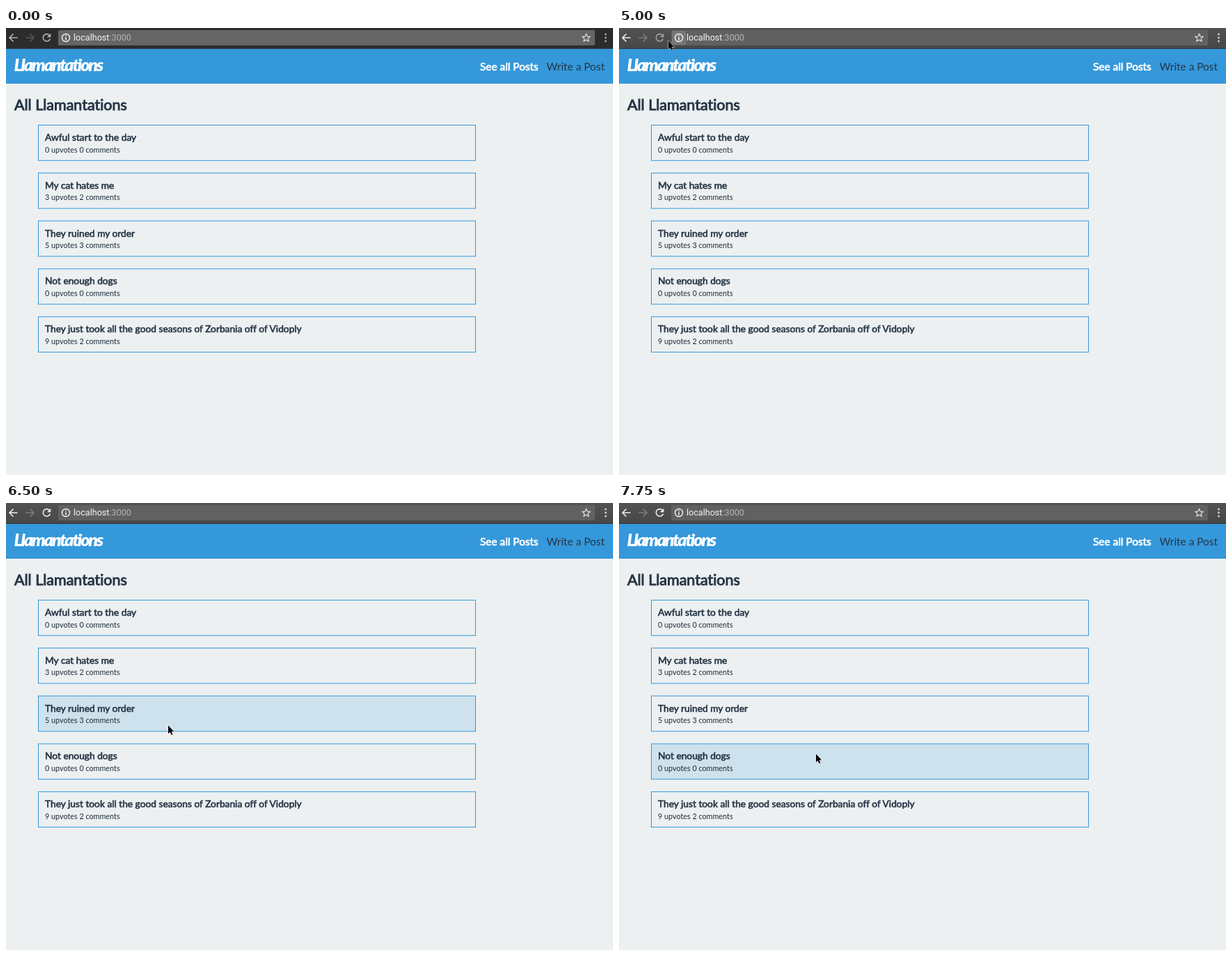
An HTML page that plays this animation: 872 by 642 pixels, repeating every 8 s.

```html
<!DOCTYPE html>
<html lang="en">
<head>
<meta charset="utf-8">
<title>All Llamantations</title>
<style>
  html, body { margin: 0; width: 100%; height: 100%; overflow: hidden; background: #ecf0f1; }
  svg { display: block; }
  text { font-family: Lato, sans-serif; fill: #263545; font-variant-ligatures: none; }
  /* Emboldened regular weight, keeping its narrower advances */
  .bold { stroke: #263545; stroke-width: .045em; }
  .heading { font-size: 21.5px; }
  .title { font-size: 13.76px; }
  .info { font-size: 10.8px; fill: #1f2c38; }
  .nav { font-size: 15.4px; }
  .current { fill: #fff; stroke: #fff; }
  .logo { font-size: 25px; font-weight: 900; font-style: italic; letter-spacing: -2.1px; fill: #fff; }
  .url { font: 12.6px Roboto, sans-serif; fill: #f4f4f4; }
  .row { stroke: #3498db; }
  .icon { fill: none; stroke-width: 1.6; }
</style>
</head>
<body>
<svg width="872" height="642" viewBox="0 0 872 642">
  <defs>
    <linearGradient id="active" x2="0" y2="1">
      <stop stop-color="#525252"/><stop offset="1" stop-color="#474747"/>
    </linearGradient>
  </defs>
  <rect width="872" height="642" fill="#ecf0f1"/>

  <rect id="bar" width="872" height="30"/>
  <rect y="29" width="872" height="1" fill="#333"/>
  <rect id="button" x="48" y="4" width="21" height="20" rx="2"/>
  <rect id="field" x="75" y="3" width="771" height="22" rx="2"/>
  <rect id="infoHover" x="76" y="4" width="20" height="20" rx="2" fill="#777"/>
  <path id="back" class="icon" d="M16.5 14H5.5M10.5 8.5L5 14L10.5 19.5"/>
  <path id="forward" class="icon" d="M28.5 14H39.5M34.5 8.5L40 14L34.5 19.5"/>
  <g id="reload">
    <path class="icon" d="M62.3 10.2A5.2 5.2 0 1 0 63.4 15.6"/>
    <path d="M64.3 7.8V13.2H58.9Z" stroke="none"/>
  </g>
  <circle cx="86" cy="14" r="5.5" fill="none" stroke="#f4f4f4" stroke-width="1.4"/>
  <path d="M86 10.5V12M86 13.2V17.5" stroke="#f4f4f4" stroke-width="1.5"/>
  <text class="url" x="97" y="18">localhost<tspan fill="#b4b4b4">:3000</tspan></text>
  <path id="star" fill="none" stroke="#e4e4e4" stroke-width="1.2" stroke-linejoin="round"/>
  <g id="dots"><circle cx="861.5" cy="9" r="1.4"/><circle cx="861.5" cy="14" r="1.4"/><circle cx="861.5" cy="19" r="1.4"/></g>

  <rect y="30" width="872" height="50" fill="#3498db"/>
  <text class="logo" x="11.5" y="62">Llamantations</text>
  <text class="nav bold current" x="681" y="61">See all Posts</text>
  <text class="nav" x="860" y="61" text-anchor="end">Write a Post</text>
  <text class="heading bold" x="12" y="118">All Llamantations</text>
  <g id="list"></g>

  <path id="cursor" d="M.5 .5V12.3L3.2 9.9L5 14.1L7 13.2L5.2 9.2H8.7Z" stroke="#fff" stroke-width="1" paint-order="stroke"/>
</svg>
<script>
const $ = id => document.getElementById(id);
const paint = (id, colour, prop = 'fill') => $(id).setAttribute(prop, colour);

const posts = [
  ['Awful start to the day', 0, 0],
  ['My cat hates me', 3, 2],
  ['They ruined my order', 5, 3],
  ['Not enough dogs', 0, 0],
  ['They just took all the good seasons of Zorbania off of Vidoply', 9, 2]
];
$('list').innerHTML = posts.map(([title, votes, comments], i) => {
  const y = 139.5 + 68.8 * i;
  return `<rect class="row" x="46.5" y="${y}" width="628" height="50.8"/>
    <text class="title bold" x="56" y="${y + 22.5}">${title}</text>
    <text class="info" x="56" y="${y + 39}">${votes} upvotes ${comments} comments</text>`;
}).join('');
const rows = document.querySelectorAll('.row');

$('star').setAttribute('d', 'M' + Array.from({ length: 10 }, (_, i) => {
  const r = i % 2 ? 2.7 : 6.1, a = i * Math.PI / 5;
  return `${833.5 + r * Math.sin(a)} ${14.3 - r * Math.cos(a)}`;
}).join('L') + 'Z');

// Pointer stops: time, x, y, hovered row
const stops = [
  [1500, 632, 382], [1750, 626, 377], [3250, 625, 377], [3500, 261, 143],
  [3750, 108, 45], [4000, 71, 23], [4250, 59, 13], [4500, 58, 12],
  [5000, 70.5, 18], [5250, 133, 18], [5500, 251, 34], [5750, 271, 142],
  [6000, 275, 177, 0], [6250, 252, 238, 1], [6500, 232.5, 319, 2],
  [6750, 206, 418, 4], [7000, 206, 444, 4], [7250, 227.5, 498],
  [7500, 238, 510], [7750, 282.5, 360, 3]
];

function draw(t) {
  const stop = stops.filter(s => s[0] <= t).pop();
  $('cursor').style.display = stop ? '' : 'none';
  if (stop) $('cursor').setAttribute('transform', `translate(${stop[1]} ${stop[2]})`);
  rows.forEach((row, i) => row.setAttribute('fill', stop && stop[3] === i ? '#cee2ed' : '#ecf0f1'));

  const active = t >= 4500, loading = t >= 5000 && t < 5250;
  paint('bar', active ? 'url(#active)' : '#2c2c2c');
  paint('field', active ? '#616161' : '#656565');
  paint('button', t >= 4250 && t < 4750 ? (active ? '#686868' : '#484848') : 'none');
  $('infoHover').style.display = loading ? '' : 'none';
  paint('back', active ? '#f0f0f0' : '#b4b4b4', 'stroke');
  paint('forward', active ? '#7c7c7c' : '#585858', 'stroke');
  const reload = loading ? '#a0a0a0' : active ? '#f0f0f0' : '#b4b4b4';
  paint('reload', reload);
  paint('reload', reload, 'stroke');
  paint('dots', active ? '#d8d8d8' : '#a8a8a8');
}

const start = performance.now();
function tick() {
  draw((performance.now() - start) % 8000);
  requestAnimationFrame(tick);
}
tick();
</script>
</body>
</html>
```
